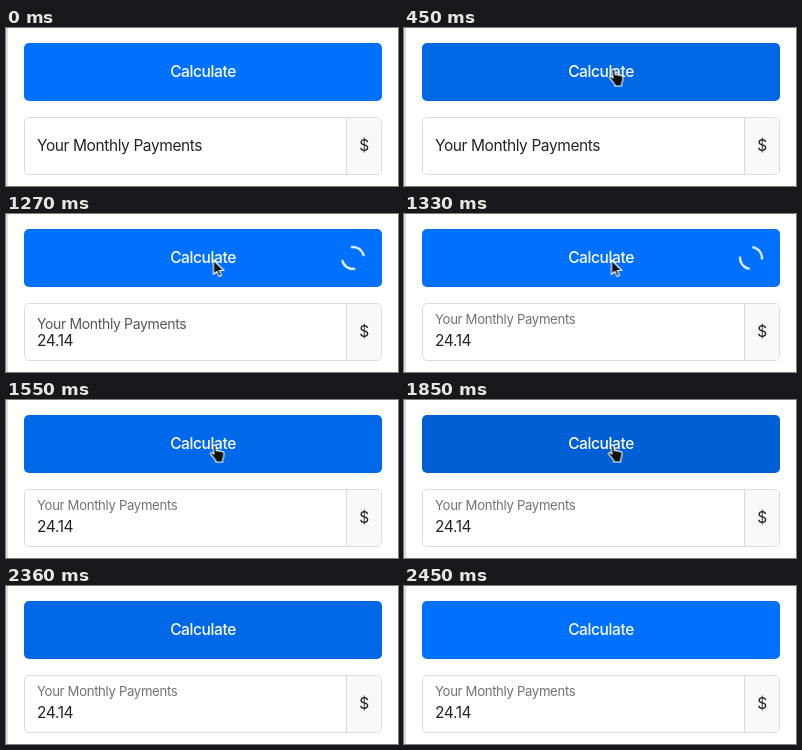
An HTML page for the animation above (2.51 s loop, 392 by 158 pixels).

```html
<!DOCTYPE html>
<html lang="en">
<head>
<meta charset="utf-8">
<title>Payment calculator</title>
<style>
  :root { --loop: 2510ms; --base: #0071fc; --mid: #0067e5; --hover: #005fd4; }
  * { box-sizing: border-box; }
  html, body { margin: 0; width: 100%; height: 100%; overflow: hidden; background: #fff; }
  body {
    position: relative;
    font: 15.5px/20px Inter, sans-serif;
    letter-spacing: -.4px;
    color: #212529;
    white-space: nowrap;
  }
  body * { position: absolute; }

  .edge { left: 0; top: 0; width: 2px; height: 100%; background: #dcdcde; }

  .button {
    left: 18px; top: 15px; width: 358px; height: 58px;
    border-radius: 5px;
    background: var(--base);
    color: #fff; font-weight: 500;
    line-height: 57px; text-align: center;
    animation: button var(--loop) linear infinite;
  }
  .spinner {
    left: 317px; top: 17px; width: 24px; height: 24px;
    border: 2px solid; border-color: #fff transparent; border-radius: 50%;
    animation: spin var(--loop) linear infinite, busy var(--loop) step-end infinite;
  }

  .field {
    left: 18px; top: 89px; width: 358px; height: 58px;
    border: 1px solid #d9dce0; border-radius: 5px;
    overflow: hidden;
  }
  .unit {
    right: 0; top: 0; width: 35px; height: 56px;
    border-left: 1px solid #d9dce0;
    background: #f8f9fa;
    line-height: 55px; text-align: center;
  }
  .label {
    left: 12px; top: 18px;
    transform-origin: 0 0;
    animation: label var(--loop) linear infinite;
  }
  .value { left: 12px; top: 27px; animation: value var(--loop) step-end infinite; }

  .cursor { left: 0; top: 0; width: 0; height: 0; animation: move var(--loop) ease-in-out infinite; }
  .cursor svg { left: 0; top: 0; overflow: visible; }
  .cursor path { fill: #111; stroke: #fff; stroke-width: 1.1; stroke-linejoin: round; }
  .hand { animation: hand var(--loop) step-end infinite; }
  .arrow { animation: arrow var(--loop) step-end infinite; }

  @keyframes button {
    0%, 15.5% { background: var(--base); }
    17.9%, 20.7% { background: var(--mid); }
    23%, 43.8% { background: var(--hover); }
    47.5%, 59% { background: var(--base); }
    65%, 91% { background: var(--hover); }
    97.5%, 100% { background: var(--base); }
  }
  @keyframes spin {
    from { transform: rotate(-347deg); }
    to { transform: rotate(406deg); }
  }
  @keyframes busy {
    0% { opacity: 0; }
    44.6% { opacity: 1; }
    59% { opacity: 0; }
  }
  @keyframes label {
    0%, 48.2% { transform: none; color: #212529; }
    52%, 100% { transform: translateY(-11px) scale(.85); color: #6f7377; }
  }
  @keyframes value {
    0% { opacity: 0; }
    48.2% { opacity: 1; }
  }
  @keyframes move {
    0%, 9% { transform: translate(222px, -22px); }
    17.9%, 20.7% { transform: translate(209.5px, 41px); }
    24%, 43.8% { transform: translate(208.5px, 45px); }
    50%, 57% { transform: translate(207.5px, 46px); }
    62%, 75% { transform: translate(208.5px, 45px); }
    86.8% { transform: translate(215.5px, 46.5px); }
    90.6%, 100% { transform: translate(221px, 65px); }
  }
  @keyframes hand {
    0% { opacity: 0; }
    15.5% { opacity: 1; }
    44.6% { opacity: 0; }
    59% { opacity: 1; }
    91% { opacity: 0; }
  }
  @keyframes arrow {
    0% { opacity: 1; }
    15.5% { opacity: 0; }
    44.6% { opacity: 1; }
    59% { opacity: 0; }
  }
</style>
</head>
<body>
  <div class="edge"></div>
  <div class="button">Calculate<i class="spinner"></i></div>
  <div class="field">
    <span class="label">Your Monthly Payments</span>
    <span class="value">24.14</span>
    <span class="unit">$</span>
  </div>
  <div class="cursor">
    <svg class="arrow" width="12" height="18">
      <path d="M0 0V14.5L3.4 11.4 5.6 16.6 8 15.6 5.8 10.5H10.4Z"/>
    </svg>
    <svg class="hand" width="15" height="18">
      <path transform="translate(-4 0)" d="M2.6 1.6c0-2 2.6-2 2.8 0L6 6c.4-1 2.4-1 2.6.3.6-.9 2.3-.7 2.5.5.7-.6 2.2-.2 2.3 1 .2 3-.1 4.5-1.2 6.5V17H5.2V15.4C3.8 13.6 2.4 11.5.6 9.6-.6 8 1 7 2.2 7.8L3.4 9Z"/>
    </svg>
  </div>
</body>
</html>
```
